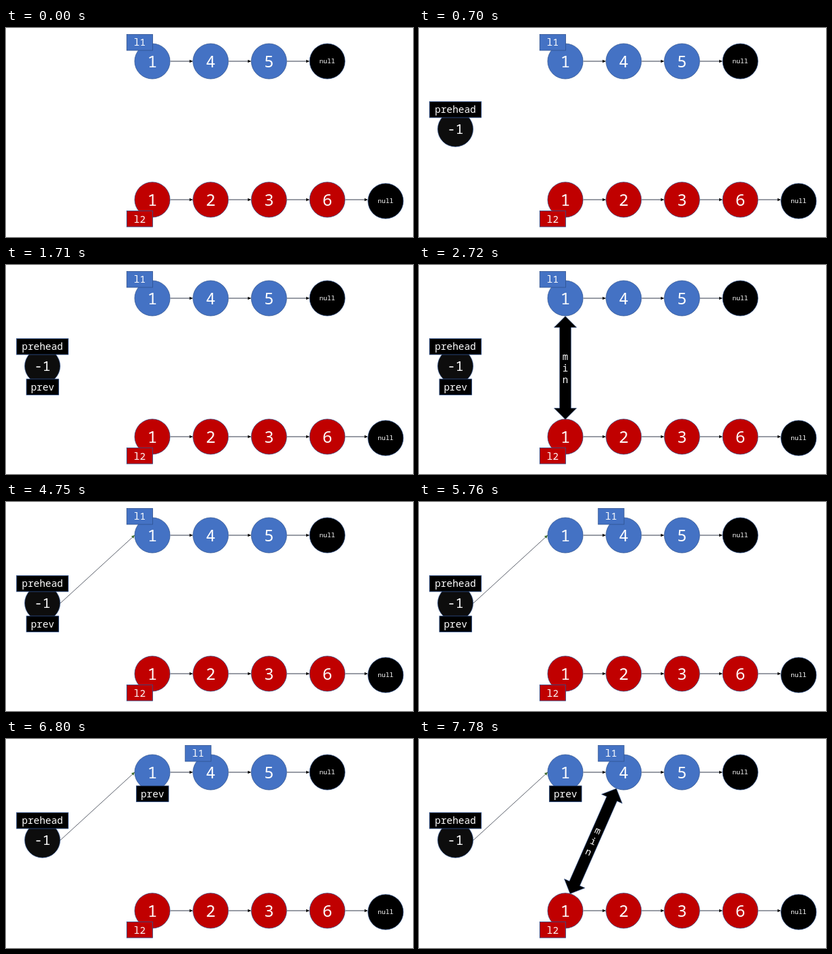
These frames come from a looping animation (598x308 px, 8000 ms). An HTML page:

```html
<!DOCTYPE html>
<html lang="en">
<head>
<meta charset="utf-8">
<title>Merging two linked lists</title>
<style>
  html, body { margin: 0; width: 100%; height: 100%; overflow: hidden; background: #fff; }
  svg { display: block; width: 598px; height: 308px; }
  text { font-family: "Noto Sans Mono", "DejaVu Sans Mono", monospace; fill: #fff; text-anchor: middle; }
</style>
</head>
<body>
<svg id="stage" viewBox="0 0 598 308"></svg>
<script>
const LOOP = 8000;
const BLUE = "#4472c4", RED = "#c00000", BLACK = "#000", OUTLINE = "#2f528f";
const STEP = 85.7, FIRST_X = 215, TOP_Y = 49, BOTTOM_Y = 253;
const stage = document.getElementById("stage");

function add(tag, attrs, parent = stage) {
  const el = document.createElementNS("http://www.w3.org/2000/svg", tag);
  for (const key in attrs) el.setAttribute(key, attrs[key]);
  return parent.appendChild(el);
}

function label(text, x, baseline, size, parent) {
  add("text", { x, y: baseline, "font-size": size }, parent).textContent = text;
}

function node(text, x, y, fill, size = 24, parent = stage) {
  add("circle", { cx: x, cy: y, r: 26, fill, stroke: OUTLINE, "stroke-width": 0.7 }, parent);
  label(text, x, y + size * 0.355, size, parent);
}

function tag(text, x, y, width, fill, baseline) {
  const g = add("g", {});
  add("rect", { x, y, width, height: 23.5, fill, stroke: OUTLINE, "stroke-width": 0.8 }, g);
  label(text, x + width / 2, baseline, 14.4, g);
  return g;
}

function link(x1, y1, x2, y2, color = "#1c2438", tip = "#000") {
  const g = add("g", {});
  const angle = Math.atan2(y2 - y1, x2 - x1) * 180 / Math.PI;
  add("line", { x1, y1, x2, y2, stroke: color, "stroke-width": 0.9 }, g);
  add("path", { d: "M0 0L-4.5 -2.3V2.3Z", fill: tip, transform: `translate(${x2} ${y2}) rotate(${angle})` }, g);
  return g;
}

function list(values, y, fill, nullY) {
  values.forEach((value, i) => {
    const x = FIRST_X + i * STEP;
    link(x + 26.5, y, x + STEP - 26.5, y);
    node(value, x, y, fill);
  });
  node("null", FIRST_X + values.length * STEP, nullY, BLACK, 9.6);
}

// Double-headed arrow with the letters of "min" along its shaft
function minArrow(x1, y1, x2, y2) {
  const half = Math.hypot(x2 - x1, y2 - y1) / 2, neck = half - 16.5;
  const angle = Math.atan2(x1 - x2, y2 - y1) * 180 / Math.PI;
  const g = add("g", { transform: `translate(${(x1 + x2) / 2} ${(y1 + y2) / 2}) rotate(${angle})` });
  add("path", {
    d: `M0 ${-half}L16.5 ${-neck}H8.3V${neck}H16.5L0 ${half}L-16.5 ${neck}H-8.3V${-neck}H-16.5Z`,
    fill: BLACK, stroke: OUTLINE, "stroke-width": 0.6
  }, g);
  [..."min"].forEach((letter, i) => label(letter, 0, (i - 1) * 17 + 5, 14, g));
  return g;
}

list([1, 4, 5], TOP_Y, BLUE, TOP_Y);
list([1, 2, 3, 6], BOTTOM_Y, RED, 255);

const highlight = add("circle", {
  cx: FIRST_X, cy: TOP_Y, r: 26, fill: "none", stroke: "#ff0", "stroke-width": 4.6
});
const firstLink = link(80, 149, 189, 49, "#4a505c", "#3c6b2c");
const head = add("g", {});
node("-1", 53.5, 149, "#0d0d0d", 20, head);
head.append(tag("prehead", 15.5, 108.5, 76, BLACK, 125));
const prev = tag("prev", 30, 168, 47.5, BLACK, 184.5);
const l1 = tag("l1", 177.5, 9.5, 38, BLUE, 26);
tag("l2", 177.5, 269.5, 38, RED, 286.5);
const firstMin = minArrow(215, 75.5, 215, 227.5);
const secondMin = minArrow(290, 73, 222, 228);

function show(el, visible) {
  el.setAttribute("visibility", visible ? "visible" : "hidden");
}

function move(el, dx, dy) {
  el.setAttribute("transform", `translate(${dx} ${dy})`);
}

function render(now) {
  const t = now % LOOP;
  show(head, t >= 700);
  show(prev, t >= 1710);
  show(firstMin, t >= 2720 && t < 4750);
  show(highlight, t >= 3730 && t < 4750);
  show(firstLink, t >= 4750);
  move(l1, t >= 5760 ? STEP : 0, 0);
  if (t >= 6800) move(prev, 161.5, -99);
  else move(prev, 0, 0);
  show(secondMin, t >= 7780);
  requestAnimationFrame(tick);
}

let start;
function tick(now) {
  start ??= now;
  render(now - start);
}
render(0);
</script>
</body>
</html>
```
